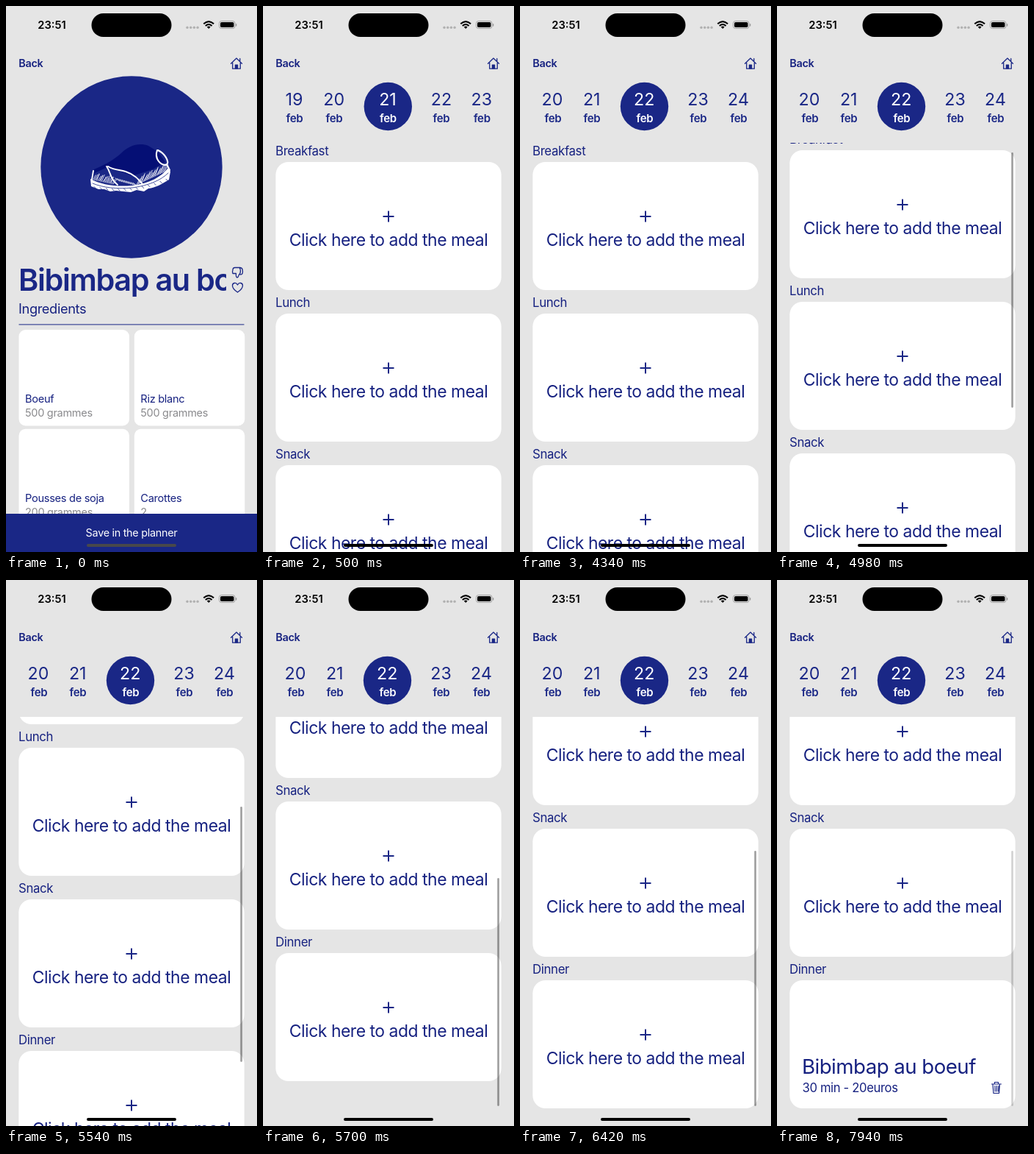
An HTML page that plays this animation: 342x742 px, repeating every 8 s.

```html
<!DOCTYPE html>
<html lang="en">
<head>
<meta charset="utf-8">
<title>Meal planner</title>
<style>
  html, body { margin: 0; width: 100%; height: 100%; overflow: hidden; background: #e5e5e5; }
  svg { display: block; width: 342px; height: 742px; }
  text { font-family: Inter, "Noto Sans", sans-serif; font-optical-sizing: none; letter-spacing: -.02em; fill: #162180; }
  .mid { text-anchor: middle; }
  .title { letter-spacing: -.032em; fill: #1a2786; }
  .line { fill: none; stroke: #1a2786; stroke-width: 1.3; stroke-linecap: round; stroke-linejoin: round; }
  .ink { fill: none; stroke: #fff; stroke-linecap: round; stroke-linejoin: round; }
</style>
</head>
<body>
<svg id="stage" viewBox="0 0 342 742">
  <defs>
    <clipPath id="listClip"><rect y="186" width="342" height="556"/></clipPath>
    <clipPath id="titleClip"><rect y="340" width="300" height="70"/></clipPath>
  </defs>
  <rect width="342" height="742" fill="#e5e5e5"/>
  <g id="recipe"></g>
  <g id="planner"></g>
  <g id="chrome"></g>
</svg>
<script>
const LOOP = 8000, NAVY = '#1a2786';
const $ = id => document.getElementById(id);

const text = (x, y, size, str, attrs = '') =>
  `<text x="${x}" y="${y}" font-size="${size}" ${attrs}>${str}</text>`;
const box = (x, y, w, h, r, fill = '#fff', attrs = '') =>
  `<rect x="${x}" y="${y}" width="${w}" height="${h}" rx="${r}" fill="${fill}" ${attrs}/>`;
const line = (d, attrs = '') => `<path class="line" d="${d}" ${attrs}/>`;
const ink = (d, width, attrs = '') => `<path class="ink" d="${d}" stroke-width="${width}" ${attrs}/>`;

// Holds each value of [[ms, value], ...] until the next one.
function play(el, prop, steps) {
  const frames = steps.map(([t, v]) => ({ offset: t / LOOP, [prop]: v, easing: 'step-end' }));
  frames.push({ offset: 1, [prop]: steps[steps.length - 1][1] });
  el.animate(frames, { duration: LOOP, iterations: Infinity });
}
const appear = (id, t) => play($(id), 'opacity', [[0, 0], [t, 1]]);
const vanish = (id, t) => play($(id), 'opacity', [[0, 1], [t, 0]]);

function shoe() {
  let hatch = '', tread = '';
  for (let i = 0; i < 18; i++) {
    hatch += `M${119 + i * 1.6} ${236 + i * .35}l${3 + i % 3} ${-6 - i % 4}`;
  }
  for (let i = 0; i < 22; i++) {
    hatch += `M${178 + i * 1.8} ${243 - i * .85}l${4 + i % 2} ${-8 - i % 5}`;
  }
  for (let i = 0; i < 9; i++) hatch += `M${149 + i * 3} ${234 + i * .8}l6 4`;
  for (let i = 0; i < 13; i++) {
    const u = i / 12;
    tread += `M${120 + 98 * u} ${245.5 + 5 * Math.sin(u * 3) - 11 * u * u}l2.5 2.5`;
  }
  return '<path d="M117 237L120 222C138 214 147 209 157 200C167 190 181 185 194 190L207 198L217 212L200 222L172 231L154 224L138 219L121 227Z" fill="#050f75"/>'
    + ink(hatch, .8)
    + '<path d="M115 235C130 243 150 246 172 244C196 241 212 232 221 220L224 225L222 236C212 242 204 247 194 248L188 252L178 250L170 253L150 251L142 252L134 249L126 249L116 245Z" fill="#fff"/>'
    + ink('M118 241C132 247 152 249 172 247C194 244 211 237 221 227' + tread, .8, `style="stroke:${NAVY}"`)
    + ink('M119 224L117 236M137 218C143 226 141 234 152 243M139 218C149 224 155 222 163 225C175 229 180 235 186 242', 1.9)
    + ink('M206 196C202 207 210 217 219 216M219 216C223 211 216 200 207 196M219 215L223 223', 2.1);
}

const ingredient = (x, y, name, amount) => box(x, y, 150.5, 130.5, 9)
  + text(x + 8.5, y + 99, 14.6, name)
  + text(x + 8.5, y + 118, 14.5, amount, 'style="fill:#8a8a8d"');

$('recipe').innerHTML =
  `<circle cx="171" cy="219" r="123.7" fill="${NAVY}"/>` + shoe()
  + `<g clip-path="url(#titleClip)">${text(17, 387, 41.4, 'Bibimbap au boeuf', 'class="title" font-weight="600"')}</g>`
  + line('M312 355.5H319Q322.5 355.5 322.5 361Q322.5 365 319.5 365M312 355.5Q309 355.5 309 359Q308 361 309 363.5H313.5Q313 368.5 315 369Q316.5 369 317 366Q319.5 364 319.5 360Q319.5 357 318 355.5')
  + line('M315.5 389C311 386 308.5 383 308.5 380C308.5 376 313.5 375 315.5 379C317.5 375 322.5 376 322.5 380C322.5 383 320 386 315.5 389Z')
  + text(17, 418, 18.2, 'Ingredients')
  + box(17.5, 432.4, 307, 1, 0, NAVY)
  + ingredient(17.5, 440, 'Boeuf', '500 grammes')
  + ingredient(174.8, 440, 'Riz blanc', '500 grammes')
  + ingredient(17.5, 574.8, 'Pousses de soja', '200 grammes')
  + ingredient(174.8, 574.8, 'Carottes', '2')
  + box(0, 690, 342, 52, 0, NAVY)
  + text(171, 721, 14.4, 'Save in the planner', 'class="mid" style="fill:#fff"')
  + box(110, 731, 122, 4, 2, '#48484b');

function dates(id, first, numX, febX) {
  const days = numX.map((x, i) => {
    const fill = i === 2 ? '#fff' : NAVY;
    return text(x, 135.3, 23.2, first + i, `class="mid" style="fill:${fill};letter-spacing:0"`)
      + text(febX[i], 157.5, 15, 'feb', `class="mid" style="fill:${fill}" font-weight="600"`);
  });
  return `<g id="${id}"><circle cx="${numX[2] + .3}" cy="136.5" r="32.7" fill="${NAVY}"/>${days.join('')}</g>`;
}

const prompt = y => line(`M163.5 ${y + 74}h15m-7.5 -7.5v15`, 'style="stroke-width:2;stroke-linecap:butt"')
  + text(171, y + 114, 22.9, 'Click here to add the meal', 'class="mid"');

const meal = y => text(34, y + 127, 27.7, 'Bibimbap au boeuf')
  + text(34.5, y + 152, 16.6, '30 min - 20euros')
  + line(`M292.5 ${y + 141}h13m-9 0v-2.5h5v2.5m-7.5 0l1 12.5h7.5l1 -12.5m-6.5 2.5l.3 7.5m2.2 -7.5v7.5m2.5 -7.5l-.3 7.5`, 'style="stroke-width:1.2"');

const slots = ['Breakfast', 'Lunch', 'Snack', 'Dinner'].map((name, i) => {
  const y = 212 + i * 206;
  const body = i < 3 ? prompt(y) : `<g id="empty">${prompt(y)}</g><g id="meal">${meal(y)}</g>`;
  return text(17, y - 9, 16.8, name) + box(17.3, y, 307.4, 174, 17.4) + body;
});

$('planner').innerHTML =
  dates('before', 19, [42.5, 96.7, 170, 243, 297.8], [43, 97, 170.5, 243, 298.3])
  + dates('after', 20, [44, 97.7, 169.2, 242.6, 297.5], [45, 98, 170, 243, 298])
  + `<g clip-path="url(#listClip)"><g id="list">${slots.join('')}</g></g>`
  + box(319.2, 199, 2.8, 347, 1.4, '#000', 'id="thumb"')
  + box(110, 731, 122, 4, 2, '#000');

$('chrome').innerHTML =
  text(62.5, 31, 14.7, '23:51', 'class="mid" font-weight="600" style="fill:#000;letter-spacing:0"')
  + box(116.5, 10, 109, 32, 16, '#000')
  + [247, 251.7, 256.4, 261.1].map(x => `<circle cx="${x}" cy="29.3" r="1.7" fill="#b1b1b1"/>`).join('')
  + '<path d="M269.3 24.3Q276.2 17.8 283.1 24.3M271.8 27Q276.2 23 280.6 27" fill="none" stroke="#000" stroke-width="2.1"/>'
  + '<path d="M273.8 28.6Q276.2 26.6 278.6 28.6L276.2 31Z"/>'
  + box(290.5, 20.5, 21.5, 10, 3, 'none', 'stroke="#999" stroke-width=".9"')
  + box(292, 22, 18.5, 7, 1.8, '#000') + box(313, 24, 1.3, 3.5, .6, '#999')
  + text(17.3, 83, 14.4, 'Back', 'font-weight="600"')
  + line('M306.5 78.3L314 71L321.5 78.3M308.7 77V85.2H319.3V77M318.8 75V71.5')
  + box(311.8, 79.5, 4.4, 6, .5, NAVY);

vanish('recipe', 500);
appear('planner', 500);
vanish('before', 4340);
appear('after', 4340);
vanish('empty', 6900);
appear('meal', 6900);

// Scroll with a fling past the end and a settle back.
const END = 286;
const scroll = [[0, 0], [4980, 16], [5540, 190], [5700, 323], [5860, 304], [6020, 290], [6260, 287], [6420, END]];
const thumbTop = d => 189 + .626 * Math.min(d, END) + Math.max(0, d - END);
play($('list'), 'transform', scroll.map(([t, d]) => [t, `translateY(${-d}px)`]));
play($('thumb'), 'y', scroll.map(([t, d]) => [t, thumbTop(d) + 'px']));
play($('thumb'), 'height', scroll.map(([t, d]) => [t, Math.min(347, 715 - thumbTop(d)) + 'px']));
play($('thumb'), 'opacity', [[0, 0], [4980, .36], [7940, .17]]);
</script>
</body>
</html>
```
